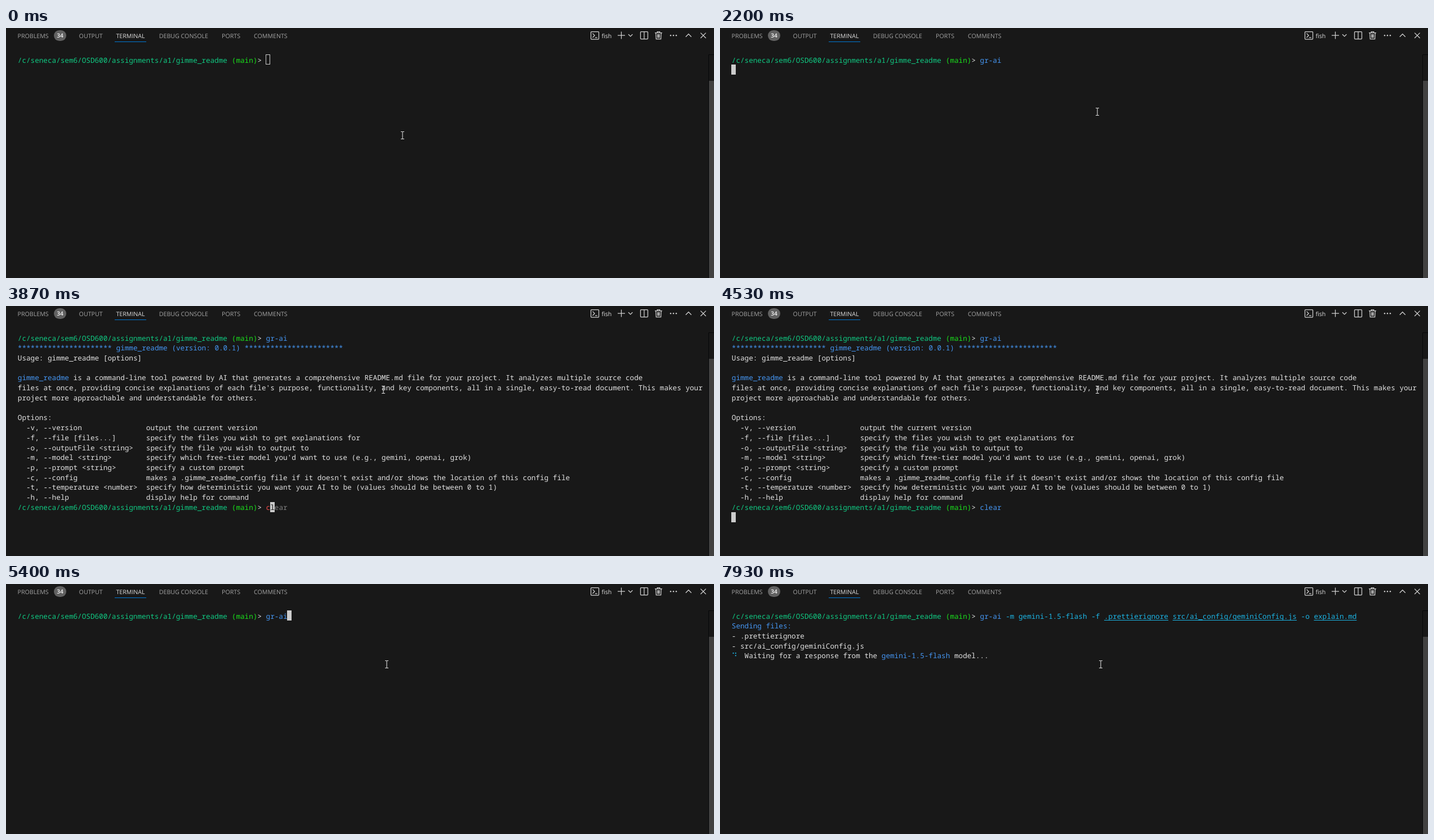
Animation of 1257x445 px, one loop 8000 ms. Source, as an HTML page:

```html
<!DOCTYPE html>
<html lang="en">
<head>
<meta charset="utf-8">
<title>Terminal session</title>
<style>
  html, body { margin: 0; width: 100%; height: 100%; overflow: hidden; background: #181818; }
  svg { display: block; width: 1257px; height: 445px; text-rendering: geometricPrecision; }
  .tabs text { font: 10.65px "Open Sans", "Noto Sans", sans-serif; fill: #a4a4a4; }
  .tabs .on { fill: #dedede; }
  .tabs .count { font-size: 10.2px; font-weight: 600; fill: #f8f8f8; text-anchor: middle; }
  .icons { fill: none; stroke: #d0d0d0; stroke-width: 1.25; }
  #screen text { font: 12.667px "Noto Sans Mono", "DejaVu Sans Mono", monospace; }
  #pointer { fill: none; stroke: #dcdcdc; stroke-width: 1.1; }
</style>
</head>
<body>
<svg viewBox="0 0 1257 445">
  <rect width="1257" height="445" fill="#181818"/>

  <g class="tabs">
    <text x="20.6" y="17.6">PROBLEMS</text>
    <rect x="85" y="4" width="22" height="19" rx="9.5" fill="#616161"/>
    <text class="count" x="96" y="17.4">34</text>
    <text x="129.6" y="17.6">OUTPUT</text>
    <text class="on" x="195.4" y="17.6">TERMINAL</text>
    <rect x="193" y="24" width="56" height="1" fill="#0078d4"/>
    <text x="271.8" y="17.6">DEBUG CONSOLE</text>
    <text x="383" y="17.6">PORTS</text>
    <text x="440" y="17.6">COMMENTS</text>
    <text class="on" x="1057.5" y="17.6">fish</text>
  </g>

  <g class="icons">
    <rect x="1038.5" y="6.5" width="14" height="13.5" rx="1"/>
    <path d="M1041.5 9.6l3.6 3.7-3.6 3.7M1045.8 17h4"/>
    <path d="M1092.5 6.5v13M1086 13h13"/>
    <path d="M1105 11.2l3.7 3.7 3.7-3.7"/>
    <rect x="1126.5" y="6.5" width="13" height="13" rx="1"/>
    <path d="M1133 6.5v13"/>
    <path d="M1152 8.5h13M1156.3 8.5v-2h4.4v2M1153.7 8.5l.6 11.2h8.4l.6-11.2M1156.8 11v6.4M1158.5 11v6.4M1160.2 11v6.4"/>
    <path d="M1206.8 15.7l5-5 5 5"/>
    <path d="M1233.2 8.6l9.4 9.4M1242.6 8.6l-9.4 9.4"/>
    <g fill="#d0d0d0" stroke="none">
      <circle cx="1180" cy="13.2" r="1.2"/><circle cx="1185" cy="13.2" r="1.2"/><circle cx="1190" cy="13.2" r="1.2"/>
    </g>
  </g>

  <path d="M1257 47.5h-9.5V445" fill="none" stroke="#060709"/>
  <rect x="1248" y="94" width="9" height="351" fill="#414141"/>

  <g id="screen">
    <rect id="cursor"/>
    <g id="spinner" fill="#1cb4e4"></g>
  </g>
  <path id="pointer" d="M-3 -6.5h2.2l.8 .6 .8 -.6h2.2M0 -6v12M-3 6.5h2.2l.8 -.6 .8 .6h2.2"/>
</svg>

<script>
const LOOP = 8000, CELL = 7.6, LINE = 17.73, LEFT = 20.8, TOP = 47.4, BASE = 61.5;
const FG = '#e2e2e2', GREEN = '#10c982', LIME = '#1ae01c', BLUE = '#4596f2',
      CYAN = '#1cb4e4', RED = '#f14c4c', GHOST = '#808080', BG = '#181818', CURSOR = '#cccccc';

const byId = id => document.getElementById(id);
const screen = byId('screen'), cursor = byId('cursor'), spinner = byId('spinner'), pointer = byId('pointer');
const timed = [];

function set(el, attrs) {
  for (const key in attrs) el.setAttribute(key, attrs[key]);
  return el;
}

function add(parent, tag, attrs) {
  return parent.appendChild(set(document.createElementNS('http://www.w3.org/2000/svg', tag), attrs));
}

// Prints text on the character grid, visible from one time to another.
function print(from, to, row, col, color, text, underline) {
  const group = add(screen, 'g', { fill: color });
  for (const word of text.matchAll(/\S+/g)) {
    add(group, 'text', { x: LEFT + (col + word.index) * CELL, y: BASE + row * LINE }).textContent = word[0];
  }
  if (underline) {
    add(group, 'rect', { x: LEFT + col * CELL, y: Math.round(BASE + row * LINE + 2), width: text.length * CELL, height: 1 });
  }
  timed.push({ el: group, from, to });
  return col + text.length;
}

function prompt(from, to, row) {
  let col = print(from, to, row, 0, GREEN, '/c/seneca/sem6/OSD600/assignments/a1/gimme_readme ');
  col = print(from, to, row, col, LIME, '(main)');
  print(from, to, row, col, FG, '>');
}

// First command and its help text
const CLEARED = 4600, INPUT = 58;
prompt(0, CLEARED, 0);
print(1000, 1600, 0, INPUT, FG, 'gr-ai');
print(1600, CLEARED, 0, INPUT, BLUE, 'gr-ai');

const help = (row, text, col = 0, color = FG) => print(2600, CLEARED, row, col, color, text);
help(1, `${'*'.repeat(22)} gimme_readme (version: 0.0.1) ${'*'.repeat(23)}`, 0, BLUE);
help(2, 'Usage: gimme_readme [options]');
help(4, 'gimme_readme', 0, BLUE);
help(4, 'is a command-line tool powered by AI that generates a comprehensive README.md file for your project. It analyzes multiple source code', 13);
help(5, "files at once, providing concise explanations of each file's purpose, functionality, and key components, all in a single, easy-to-read document. This makes your");
help(6, 'project more approachable and understandable for others.');
help(8, 'Options:');
[
  ['-v, --version', 'output the current version'],
  ['-f, --file [files...]', 'specify the files you wish to get explanations for'],
  ['-o, --outputFile <string>', 'specify the file you wish to output to'],
  ['-m, --model <string>', "specify which free-tier model you'd want to use (e.g., gemini, openai, grok)"],
  ['-p, --prompt <string>', 'specify a custom prompt'],
  ['-c, --config', "makes a .gimme_readme_config file if it doesn't exist and/or shows the location of this config file"],
  ['-t, --temperature <number>', 'specify how deterministic you want your AI to be (values should be between 0 to 1)'],
  ['-h, --help', 'display help for command']
].forEach(([flag, about], i) => {
  help(9 + i, flag, 2);
  help(9 + i, about, 30);
});

// Typing "clear" over its suggestion
prompt(2870, CLEARED, 17);
const keys = [3870, 4130, 4200, 4270, 4330];
[...'clear'].forEach((letter, i) => {
  const put = (from, to, color) => print(from, to, 17, INPUT + i, color, letter);
  if (i) {
    put(keys[0], keys[i - 1], GHOST);
    put(keys[i - 1], keys[i], BG);
  }
  put(keys[i], keys[4], RED);
  put(keys[4], CLEARED, BLUE);
});

// Second command and its response
prompt(4870, LOOP, 0);
print(5070, 5330, 0, INPUT, FG, 'gr-ai');
print(5330, LOOP, 0, INPUT, BLUE, 'gr-ai');
let end = INPUT + 6;
for (const arg of ['-m', 'gemini-1.5-flash', '-f', '.prettierignore', 'src/ai_config/geminiConfig.js', '-o', 'explain.md']) {
  end = print(5670, LOOP, 0, end, CYAN, arg, /^\.|\.(js|md)$/.test(arg)) + 1;
}
print(7000, LOOP, 1, 0, BLUE, 'Sending files:');
print(7000, LOOP, 2, 0, FG, '- .prettierignore');
print(7000, LOOP, 3, 0, FG, '- src/ai_config/geminiConfig.js');
let tail = print(7070, LOOP, 4, 3, FG, 'Waiting for a response from the ');
tail = print(7070, LOOP, 4, tail, BLUE, 'gemini-1.5-flash');
print(7070, LOOP, 4, tail, FG, ' model...');

// Braille dots, numbered down the left column and then the right
const dots = [0, 1, 2, 3, 4, 5].map(i =>
  add(spinner, 'circle', { cx: i < 3 ? 23.6 : 27.8, cy: 123.2 + (i % 3) * 4.2, r: 1.1 }));
const SPIN = [...'⠋⠙⠹⠸⠼⠴⠦⠧⠇⠏'].map(c => c.charCodeAt(0) & 63);

// [time, column, row]
const cursorStops = [
  [0, INPUT, 0], [1000, 63, 0], [2200, 0, 1], [2600, 0, 17], [2870, INPUT, 17],
  ...keys.map((time, i) => [time, INPUT + 1 + i, 17]),
  [4530, 0, 18], [CLEARED, 0, 0], [4870, INPUT, 0], [5070, 63, 0], [5670, end - 1, 0],
  [6600, 0, 1], [7000, 0, 4]
];
// [time, x, y]
const pointerStops = [
  [0, 704, 191], [70, 690, 173], [130, 674, 153], [200, 670, 149], [5330, 673, 146], [5400, 676, 143]
];
const latest = (stops, t) => stops.findLast(stop => stop[0] <= t);

function drawCursor(t) {
  const [, col, row] = latest(cursorStops, t);
  const hollow = t < 200, inset = hollow ? 0.5 : 0;
  cursor.style.display = t < 7070 ? '' : 'none';
  set(cursor, {
    x: Math.floor(LEFT + col * CELL) + inset,
    y: Math.round(TOP + row * LINE) + inset,
    width: 8 - 2 * inset,
    height: 18 - 2 * inset,
    fill: hollow ? 'none' : CURSOR,
    stroke: hollow ? CURSOR : 'none'
  });
}

function drawSpinner(t) {
  spinner.style.display = t < 7070 ? 'none' : '';
  const step = t < 7130 ? 0 : t < 7270 ? 1 : 3 + Math.floor(Math.floor((t - 7270) / 66) * 0.8);
  const mask = SPIN[step % SPIN.length];
  dots.forEach((dot, i) => dot.style.display = mask >> i & 1 ? '' : 'none');
}

const start = performance.now();
function frame() {
  const t = (performance.now() - start) % LOOP;
  for (const { el, from, to } of timed) el.style.display = t >= from && t < to ? '' : 'none';
  drawCursor(t);
  drawSpinner(t);
  const [, x, y] = latest(pointerStops, t);
  set(pointer, { transform: `translate(${x} ${y})` });
  requestAnimationFrame(frame);
}
frame();
</script>
</body>
</html>
```
